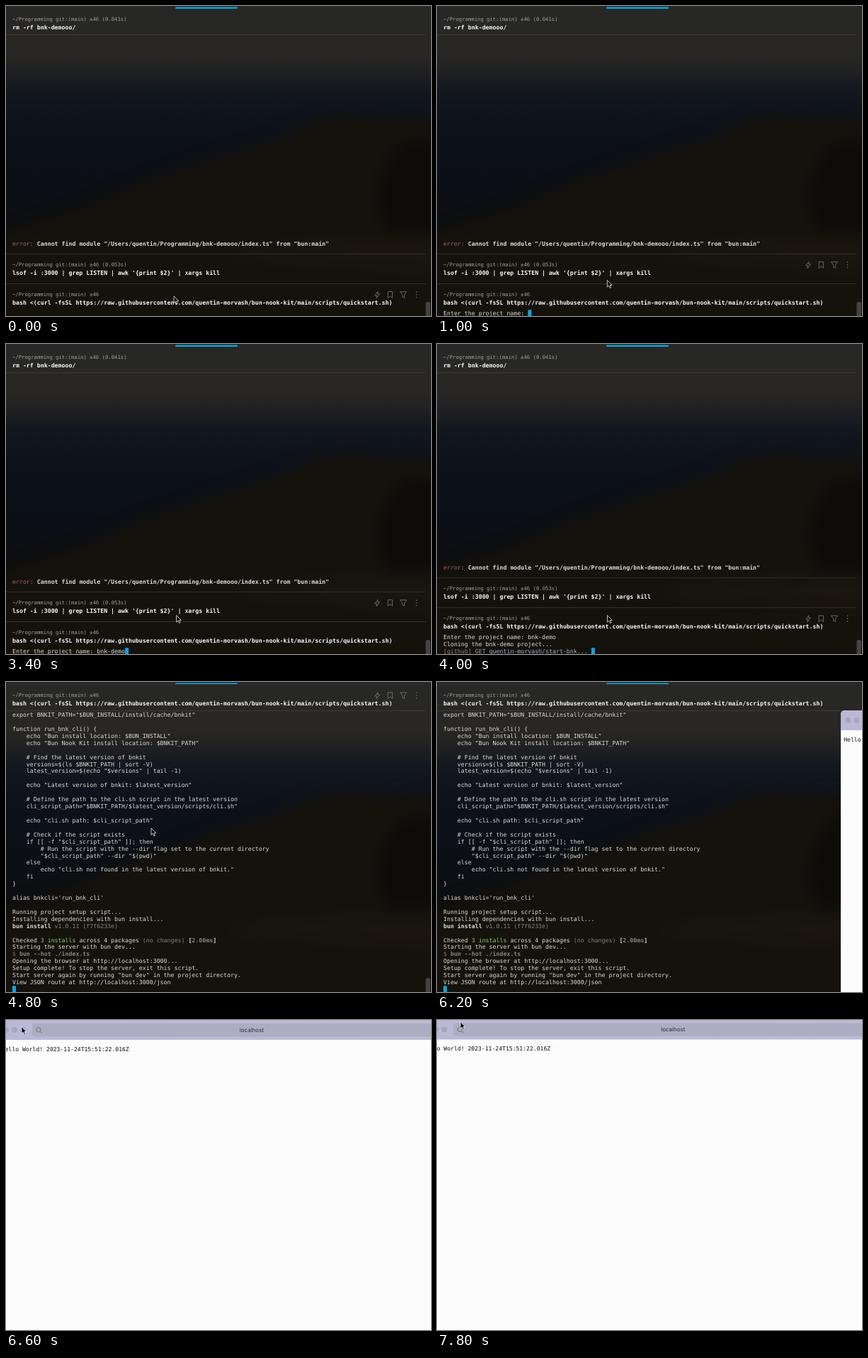
An HTML page that plays this animation: 600x437 px, repeating every 8 s.

```html
<!DOCTYPE html>
<html lang="en">
<head>
<meta charset="utf-8">
<title>Terminal quickstart</title>
<style>
html, body { margin: 0; width: 100%; height: 100%; overflow: hidden; background: #11100f; }
svg { display: block; width: 600px; height: 437px; }
text { font: 8.26px "DejaVu Sans Mono", monospace; fill: #dcdad7; white-space: pre; text-rendering: geometricPrecision; }
text.prompt { font-size: 7.26px; fill: #a19f9c; }
text.page { font-size: 8.08px; fill: #111; }
text.title { font: 8px Inter, sans-serif; fill: #33323c; text-anchor: middle; }
.bold, .cmd, .dimBold { font-weight: bold; }
.cmd { fill: #f8f7f5; }
.dim, .dimBold { fill: #858381; }
.red { fill: #a5606a; }
.rose { fill: #98606c; }
.green { fill: #86d05c; }
.steel { fill: #8f9bab; }
.blue { fill: #94b0cd; }
</style>
</head>
<body>
<svg id="stage" viewBox="0 0 600 437" xmlns="http://www.w3.org/2000/svg">
  <defs>
    <linearGradient id="sky" x2="0" y2="1">
      <stop offset="0" stop-color="#272725"/>
      <stop offset=".15" stop-color="#282724"/>
      <stop offset=".2" stop-color="#222223"/>
      <stop offset=".27" stop-color="#13171e"/>
      <stop offset=".4" stop-color="#0c111a"/>
      <stop offset=".6" stop-color="#0c0f15"/>
      <stop offset=".75" stop-color="#0e0e0e"/>
      <stop offset="1" stop-color="#12110e"/>
    </linearGradient>
    <linearGradient id="bar" x2="1" y2="0">
      <stop offset="0" stop-color="#bbb8d7"/>
      <stop offset="1" stop-color="#bdbbd0"/>
    </linearGradient>
    <filter id="soft" x="-20%" y="-20%" width="140%" height="140%" color-interpolation-filters="sRGB"><feGaussianBlur stdDeviation="10"/></filter>
    <clipPath id="below"><rect y="41" width="600" height="396"/></clipPath>
  </defs>

  <rect width="600" height="437" fill="url(#sky)"/>
  <g filter="url(#soft)">
    <path d="M-30 330 L113 282 L197 246 L294 214 L390 184 L438 160 L487 153 L535 160 L640 158 V470 H-30Z" fill="#15120c"/>
    <path d="M560 190 Q500 260 540 320 H640 V190Z" fill="#0d0c09"/>
    <path d="M300 350 Q470 325 640 330 V375 Q460 362 300 350Z" fill="#1a150e"/>
  </g>

  <g id="terminal">
    <g id="body" clip-path="url(#below)"></g>
    <path d="M0 40.5H592" stroke="#3d3b39"/>
    <rect x="239" y="1.6" width="88" height="2.2" rx="1" fill="#08aeea"/>
    <rect x="592.5" y="417" width="6.5" height="22" rx="3" fill="#454341"/>
    <g id="tools" fill="none" stroke="#73716e" stroke-width=".9" stroke-linejoin="round">
      <path d="M525 -4.5 L520.5 1H523.6L522.8 4.8L527.6 -1.2H524.4Z"/>
      <path d="M539.2 -4.3H545.4V4.5L542.3 1.8L539.2 4.5Z"/>
      <path d="M556.5 -4.2H565.5L562.3 .2V4.4L559.7 3V.2Z"/>
      <path d="M579.5 -3.8V4" stroke-width="1.6" stroke-linecap="round" stroke-dasharray="0 3.8"/>
    </g>
  </g>

  <g id="browser">
    <path d="M0 480V6Q0 0 6 0H760V480Z" fill="#fdfcfd"/>
    <path d="M0 28V6Q0 0 6 0H760V28Z" fill="url(#bar)"/>
    <rect x="47.3" y="4.8" width="620" height="18.6" rx="4" fill="#aeacc3"/>
    <g fill="#a7a4bd">
      <circle cx="10.3" cy="14" r="3.9"/><circle cx="22.3" cy="14" r="3.9"/><circle cx="34.3" cy="14" r="3.9"/>
    </g>
    <path d="M59.6 13.8a3.2 3.2 0 1 0-6.4 0a3.2 3.2 0 1 0 6.4 0M58.8 16.2L61.2 18.6" fill="none" stroke="#696777" stroke-width=".9"/>
    <text class="title" x="357.3" y="16.8">localhost</text>
    <text class="page" x="4.2" y="44">Hello World! 2023-11-24T15:51:22.016Z</text>
  </g>

  <path id="pointer" d="M0 0V9.6L2.2 7.6L3.8 11L5.4 10.3L3.9 7H6.8Z" fill="#080808" stroke="#eee" stroke-width=".8"/>
</svg>

<script>
const LOOP = 8000, TICK = 200, ROW = 9.92, CHAR = 8.26 * 0.602, LEFT = 9;
const $ = id => document.getElementById(id);

function add(parent, tag, attrs = {}, content = "") {
  const node = document.createElementNS("http://www.w3.org/2000/svg", tag);
  for (const key in attrs) node.setAttribute(key, attrs[key]);
  node.textContent = content;
  return parent.appendChild(node);
}

const move = (node, x, y) => node.setAttribute("transform", `translate(${x} ${y})`);
const show = (node, on) => node.setAttribute("visibility", on ? "visible" : "hidden");

// A line is plain text or a list of [text, class] spans.
function addLine(parent, line, y) {
  const text = add(parent, "text", { x: LEFT, y });
  const spans = Array.isArray(line) ? line : [[line, ""]];
  for (const [content, style] of spans) add(text, "tspan", { class: style }, content);
  return text;
}

const lineLength = line => Array.isArray(line) ? line.reduce((n, [s]) => n + s.length, 0) : line.length;

function addBlock(parent, prompt, command, ruled) {
  const block = add(parent, "g");
  if (ruled) add(block, "path", { d: "M0 -15.5H592", stroke: "#312f2d" });
  add(block, "text", { class: "prompt", x: LEFT, y: 2.3 }, "~/Programming git:(main) ±46" + prompt);
  add(block, "text", { class: "cmd", x: LEFT, y: 14.2 }, command);
  return block;
}

const question = "Enter the project name: ";
const script = String.raw`export BNKIT_PATH="$BUN_INSTALL/install/cache/bnkit"

function run_bnk_cli() {
    echo "Bun install location: $BUN_INSTALL"
    echo "Bun Nook Kit install location: $BNKIT_PATH"

    # Find the latest version of bnkit
    versions=$(ls $BNKIT_PATH | sort -V)
    latest_version=$(echo "$versions" | tail -1)

    echo "Latest version of bnkit: $latest_version"

    # Define the path to the cli.sh script in the latest version
    cli_script_path="$BNKIT_PATH/$latest_version/scripts/cli.sh"

    echo "cli.sh path: $cli_script_path"

    # Check if the script exists
    if [[ -f "$cli_script_path" ]]; then
        # Run the script with the --dir flag set to the current directory
        "$cli_script_path" --dir "$(pwd)"
    else
        echo "cli.sh not found in the latest version of bnkit."
    fi
}

alias bnkcli='run_bnk_cli'

Running project setup script...
Installing dependencies with bun install...`;

const lines = [
  question + "bnk-demo",
  "Cloning the bnk-demo project...",
  [["[github] ", "dim"], ["GET ", "steel"], ["quentin-morvash/start-bnk... ", "blue"]],
  ...script.split("\n"),
  [["bun install", "bold"], [" v1.0.11 (f7f6233e)", "dim"]],
  "",
  [["Checked ", ""], ["3 installs", "green"], [" across 4 packages ", ""], ["(no changes) ", "dim"], ["[", "bold"], ["2.00ms", "dimBold"], ["]", "bold"]],
  "Starting the server with bun dev...",
  [["$ ", "rose"], ["bun --hot ./index.ts", "dimBold"]],
  "Opening the browser at http://localhost:3000...",
  "Setup complete! To stop the server, exit this script.",
  'Start server again by running "bun dev" in the project directory.',
  "View JSON route at http://localhost:3000/json",
  ""
];

const body = $("body"), terminal = $("terminal");
const history = add(body, "g");
addLine(history, [["error", "red"], [": ", "dim"], ['Cannot find module "/Users/quentin/Programming/bnk-demooo/index.ts" from "bun:main"', "bold"]], 338);
move(addBlock(history, " (0.053s)", "lsof -i :3000 | grep LISTEN | awk '{print $2}' | xargs kill", true), 0, 365);

const output = add(body, "g");
const rows = lines.map((line, i) => addLine(output, line, 436 + i * ROW));
const answer = rows[0].firstChild;
const caret = add(terminal, "rect", { y: 428.4, width: 5, height: 10, fill: "#0aa6e4" });

const oldBlock = addBlock(terminal, " (0.041s)", "rm -rf bnk-demooo/", false);
move(oldBlock, 0, 19);
const runBlock = addBlock(terminal, "", "bash <(curl -fsSL https://raw.githubusercontent.com/quentin-morvash/bun-nook-kit/main/scripts/quickstart.sh)", true);

// Tracks: [time, ...values]
const rowTrack = [[0, 0], [600, 1], [3800, 3], [4400, lines.length]];
const typeTrack = [[0, 0], [2000, 1], [2200, 2], [2400, 3], [2600, 4], [3000, 5], [3200, 6], [3400, 8]];
// The window is dragged in from beyond the right edge, where the pointer went to fetch it.
const windowTrack = [[0, 700, 40], [6000, 700, 40], [6200, 570, 40], [6400, 348.8, 24], [6600, -10.4, 0], [6800, -24, -.6]];
const pointerTrack = [
  [0, 237, 409], [1200, 241, 382], [4000, 240.5, 382.5], [4800, 205, 206], [5400, 620, 40],
  [6000, 620, 40], [6200, 614, 50], [6400, 393, 34.5], [6600, 22, 9.5], [6800, 20, 9.5], [7200, 20, 9.5], [7800, 33, 2.5]
];

const hold = (track, t) => track.findLast(key => key[0] <= t).slice(1);

function glide(track, t) {
  const i = track.findLastIndex(key => key[0] <= t);
  const a = track[i], b = track[i + 1] || a;
  const p = a === b ? 0 : (t - a[0]) / (b[0] - a[0]);
  return a.slice(1).map((v, k) => v + (b[k + 1] - v) * p);
}

function render(time) {
  const t = Math.floor((time % LOOP) / TICK) * TICK;
  const [count] = hold(rowTrack, t), [typed] = hold(typeTrack, t);
  const scroll = Math.max(0, count - 1) * ROW;

  answer.textContent = question + "bnk-demo".slice(0, typed);
  rows.forEach((row, i) => show(row, i < count));
  move(history, 0, -scroll);
  move(output, 0, -scroll);

  const top = Math.max(19, 407 - scroll), pinned = top === 19;
  move(runBlock, 0, top);
  show(oldBlock, !pinned);
  show(history, !pinned);

  const last = count === 1 ? question.length + typed : count ? lineLength(lines[count - 1]) : 0;
  caret.setAttribute("x", LEFT + last * CHAR);
  show(caret, count > 0);

  const [px, py] = glide(pointerTrack, t);
  const dragging = t >= 6200;
  move($("pointer"), px, py);
  move($("tools"), 0, py > top - 15.5 ? top : 365 - scroll);
  show($("tools"), px < 600 && !dragging);

  move($("browser"), ...glide(windowTrack, t));
  show($("browser"), dragging);
}

let start;
function frame(now) {
  start ??= now;
  render(now - start);
  requestAnimationFrame(frame);
}
render(0);
requestAnimationFrame(frame);
</script>
</body>
</html>
```
